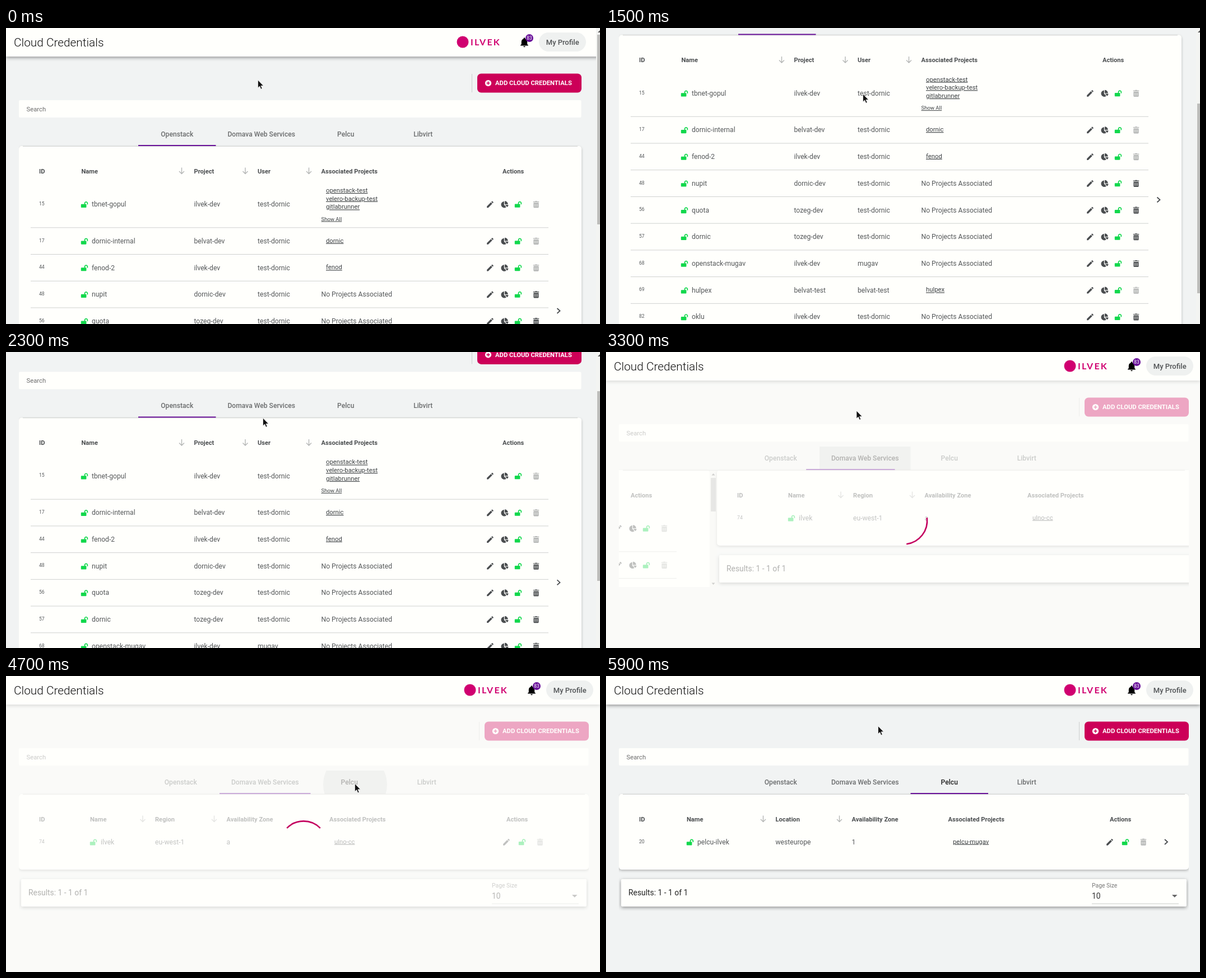
Write an HTML page that moves like this. It is 1060x529 px and loops after 6700 ms.

```html
<!DOCTYPE html>
<html lang="en">
<head>
<meta charset="utf-8">
<title>Cloud Credentials</title>
<style>
  html, body { margin: 0; width: 100%; height: 100%; overflow: hidden; background: #f1f3f3; }
  svg { display: block; font-family: Roboto, sans-serif; }
  .card { fill: #fffffc; filter: drop-shadow(0 2px 2px rgba(0,0,0,.25)); }
  .bar { fill: #fffffc; filter: drop-shadow(0 2px 3px rgba(0,0,0,.4)); }
  .link { text-decoration: underline; }
</style>
</head>
<body>
<svg id="stage" width="1060" height="529" viewBox="0 0 1060 529"></svg>
<script>
const LOOP = 6700, STEP = 100, SLIDE = 1017;
const INK = '#55585a', DARK = '#3c4043', GREEN = '#12d84c', PINK = '#cc0058', PURPLE = '#6a1299', WHITE = '#fffffc';

const ICONS = {
  lock: [576, 512, 12.4, 'M423.5 0C339.5.3 272 69.5 272 153.5V224H48c-26.5 0-48 21.5-48 48v192c0 26.5 21.5 48 48 48h352c26.5 0 48-21.5 48-48V272c0-26.5-21.5-48-48-48h-48v-71c0-40 32-73 71-73 40 0 73 32 73 72v80c0 13 11 24 24 24h32c13 0 24-11 24-24v-80C576 68 507.500 0 423.500 0z'],
  pencil: [24, 24, 15.6, 'M3 17.250V21h3.750L17.810 9.940l-3.750-3.750L3 17.250zM20.710 7.040c.39-.39.39-1.020 0-1.410l-2.340-2.340c-.39-.39-1.020-.39-1.410 0l-1.830 1.830 3.750 3.750z'],
  pie: [544, 512, 13, 'M528 288H290l158 158c6 6 16 7 23 1 38-37 65-86 73-141 1-10-7-18-16-18zM512 223C504 104 408 8 289 0c-9 0-17 7-17 16v224h224c9 0 17-8 16-17zM224 288V51c0-10-8-18-18-16C87 52-4 156 0 280c4 129 115 234 243 232 50-1 97-17 135-44 8-6 9-17 2-24z'],
  trash: [448, 512, 10.6, 'M32 464a48 48 0 0 0 48 48h288a48 48 0 0 0 48-48V128H32zM304 208h32v224h-32zM208 208h32v224h-32zM112 208h32v224h-32zM432 32H312l-10-19a24 24 0 0 0-21-13H167a24 24 0 0 0-22 13l-9 19H16a16 16 0 0 0-16 16v32h448V48a16 16 0 0 0-16-16z'],
  bell: [24, 24, 20.8, 'M12 22c1.100 0 2-.9 2-2h-4c0 1.100.89 2 2 2zm6-6v-5c0-3.070-1.640-5.640-4.500-6.320V4c0-.83-.67-1.500-1.500-1.500s-1.500.67-1.500 1.500v.68C7.630 5.360 6 7.920 6 11v5l-2 2v1h16v-1l-2-2z']
};

const text = (x, y, str, size = 12.13, fill = INK, weight = 400, extra = '') =>
  `<text x="${x}" y="${y}" font-size="${size}" fill="${fill}" font-weight="${weight}" ${extra}>${str}</text>`;
const rect = (x, y, w, h, extra) => `<rect x="${x}" y="${y}" width="${w}" height="${h}" ${extra}/>`;
const path = (d, stroke, width = 1, extra = '') =>
  `<path d="${d}" fill="none" stroke="${stroke}" stroke-width="${width}" ${extra}/>`;
const link = (x, y, str, size = 11.27) => text(x, y, str, size, DARK, 400, 'class="link"');
const icon = (name, cx, cy, fill = '#4a4d4f') => {
  const [w, h, width, d] = ICONS[name], k = width / w;
  return `<path d="${d}" fill="${fill}" fill-rule="evenodd" transform="translate(${cx - width / 2} ${cy - h * k / 2}) scale(${k})"/>`;
};
const chevron = (x, y) => path(`M${x - 2.5} ${y - 4.500}l5 4.500-5 4.500`, '#4a4d4f', 1.8);
const sortArrow = x => path(`M${x} 249.500v11M${x - 4.500} 256l4.500 4.500 4.500-4.500`, '#b4b6b5', 1.4);
const heads = (cols, arrows) =>
  cols.map(([x, s]) => text(x, 259.5, s, 11.15, '#4a4d4f', 700)).join('') + arrows.map(sortArrow).join('');

function row(cy, id, iconX, name, cells, actions, locked) {
  return text(59, cy + 2, id, 8.67) + icon('lock', iconX + 6, cy + .5, GREEN) + text(iconX + 19, cy + 4.3, name) +
    cells.map(([x, s]) => text(x, cy + 4.3, s)).join('') +
    actions.map(([name, x]) => icon(name, x, cy + .3,
      name === 'lock' ? GREEN : name === 'trash' && locked ? '#b2b4b3' : undefined)).join('');
}

function openstackTable() {
  const rows = [
    ['15', 'tbnet-gopul', 'ilvek-dev', 'test-dornic', ''],
    ['17', 'dornic-internal', 'belvat-dev', 'test-dornic', 'dornic'],
    ['44', 'fenod-2', 'ilvek-dev', 'test-dornic', 'fenod'],
    ['48', 'nupit', 'dornic-dev', 'test-dornic'],
    ['56', 'quota', 'tozeg-dev', 'test-dornic'],
    ['57', 'dornic', 'tozeg-dev', 'test-dornic'],
    ['68', 'openstack-mugav', 'ilvek-dev', 'mugav'],
    ['69', 'hulpex', 'belvat-test', 'belvat-test', 'hulpex'],
    ['82', 'oklu', 'ilvek-dev', 'test-dornic']
  ];
  let out = rect(23, 211, 1004, 553, 'rx="5" class="card"') +
    heads([[59, 'ID'], [134.5, 'Name'], [335.5, 'Project'], [449, 'User'], [562.5, 'Associated Projects'], [886, 'Actions']],
      [313.5, 427, 540.5]);
  rows.forEach(([id, name, project, user, linked], i) => {
    const line = 356.8 + 47.72 * i, cy = i ? line - 23.9 : 315, locked = linked !== undefined;
    const cells = [[335.5, project], [449, user]];
    if (!locked) cells.push([562.5, 'No Projects Associated']);
    if (linked) out += link(571, cy + 3, linked);
    out += row(cy, id, 134, name, cells, [['pencil', 864], ['pie', 890], ['lock', 914], ['trash', 946]], locked);
    if (i < rows.length - 1) out += path(`M44 ${line}H968`, '#cfd1d0');
  });
  out += ['openstack-test', 'velero-backup-test', 'gitlabrunner'].map((s, i) => link(571, 294 + i * 14.7, s)).join('');
  return out + link(562.5, 344.5, 'Show All', 9.54) + chevron(986, 505.5);
}

// Scrollbar the first table gets once its view is shorter than its content
const innerBar = rect(1027, 211, 13, 209, 'fill="#f1f1ef"') + rect(1029, 225, 9, 60, 'fill="#bcbcba"') +
  '<path d="M1030.500 220.500h6l-3-3.500zM1030.500 412.500h6l-3 3.500z" fill="#777"/>';

const shortTable = (head, arrows, body) =>
  rect(23, 211, SLIDE, 135, 'rx="5" class="card"') + heads(head, arrows) + body +
  rect(27, 363, 1009, 49, 'rx="2" class="bar"') + text(40, 392, 'Results: 1 - 1 of 1', 13.87, '#222') +
  text(867, 377.5, 'Page Size', 10.4, '#777') + text(867, 398, '10', 13.87, '#333') +
  path('M867 407H1022', '#c8cac9') + '<path d="M1010 391h9.500l-4.750 4.750z" fill="#666"/>';

const domavaTable = shortTable(
  [[59, 'ID'], [150, 'Name'], [266, 'Region'], [393.5, 'Availability Zone'], [577, 'Associated Projects'], [893, 'Actions']],
  [244, 371.5],
  row(296.5, '74', 150, 'ilvek', [[266, 'eu-west-1'], [393.5, 'a']], [['pencil', 893], ['lock', 921], ['trash', 953]], true) +
  link(586, 299.5, 'ulno-cc'));

const pelcuTable = shortTable(
  [[59, 'ID'], [144, 'Name'], [302.5, 'Location'], [438.5, 'Availability Zone'], [610.5, 'Associated Projects'], [899, 'Actions']],
  [280.5, 416.5],
  row(296.5, '20', 144, 'pelcu-ilvek', [[302.5, 'westeurope'], [438.5, '1']], [['pencil', 899], ['lock', 927], ['trash', 959]], true) +
  link(619, 299.5, 'pelcu-mugav') + chevron(999.5, 296.5));

const TABS = [['Openstack', 236, 138.5], ['Domava Web Services', 374.5, 162.5], ['Pelcu', 537, 138.5], ['Libvirt', 675, 138.5]];

document.getElementById('stage').innerHTML = `
  <defs>
    <clipPath id="viewClip"><rect id="viewRect" x="23" y="205" width="${SLIDE}"/></clipPath>
    <clipPath id="tabClip"><rect id="tabRect" y="169" height="42"/></clipPath>
  </defs>
  ${rect(0, 0, 1060, 529, 'fill="#f1f3f3"')}
  <g id="page">
    ${rect(0, 0, 1060, 51, 'class="bar"')}
    ${text(14, 32.5, 'Cloud Credentials', 20.8, '#111', 300)}
    <g class="right">
      <circle cx="815" cy="25" r="10.5" fill="#d00070"/>
      ${text(829, 31, 'ILVEK', 16, '#d00070', 700, 'letter-spacing="2.2" style="font-family:Lato,sans-serif"')}
      ${icon('bell', 925, 25.5, '#000')}
      <circle cx="934" cy="18" r="7" fill="${PURPLE}"/>
      ${text(934, 21, '83', 8.4, '#fff', 400, 'text-anchor="middle"')}
      ${rect(951, 8, 84, 34, 'rx="17" fill="#eff1f0"')}
      ${text(993.2, 29.5, 'My Profile', 13, '#505355', 500, 'text-anchor="middle"')}
    </g>
    <g class="right">
      ${path('M831.500 82V115', '#cdcfce')}
      ${rect(841, 81.5, 186, 34, `rx="7" fill="${PINK}"`)}
      <circle cx="860.5" cy="98.5" r="5.6" fill="#fff"/>
      ${path('M857.500 98.500h6M860.500 95.500v6', PINK, 1.6)}
      ${text(873, 102.3, 'ADD CLOUD CREDENTIALS', 11.27, '#fff', 700)}
    </g>
    ${rect(23, 129, 0, 31, `id="search" rx="2" fill="${WHITE}"`)}
    ${text(36.5, 148.5, 'Search', 11.27, '#6c6c6c')}
    <g clip-path="url(#viewClip)">
      <g class="view">${openstackTable()}<g id="innerBar">${innerBar}</g></g>
      <g class="view">${domavaTable}</g>
      <g class="view">${pelcuTable}</g>
    </g>
    <path id="rule" stroke="#cdcfce"/>
    <g id="tabs">
      <circle id="ripple" clip-path="url(#tabClip)"/>
      ${TABS.map(([s, x, w]) => text(x + w / 2, 194, s, 12.13, '#6b6d6e', 500, 'class="tab" text-anchor="middle"')).join('')}
      <rect id="marker" y="209" height="2" fill="${PURPLE}"/>
    </g>
    ${rect(0, 51, 1060, 760, `id="veil" fill="${WHITE}" opacity=".65"`)}
  </g>
  <g id="pageBar">
    ${rect(1053, 0, 7, 529, 'fill="#f3f4f2"')}
    <path d="M1056 8h4v-4z" fill="#555"/>
    ${rect(1055, 12, 5, 339, 'id="thumb" fill="#bdbdbb"')}
  </g>
  ${path('M501.200 271.800A42 42 0 0 1 560.800 271.800', '#c4005f', 2.6, 'id="spinner"')}
  <path id="cursor" d="M0 0V14L3.200 11 5.400 16.200 7.700 15.200 5.500 10.300H10Z" fill="#111" stroke="#fff" stroke-width=".7"/>`;

const $ = id => document.getElementById(id);
const set = (el, attrs) => Object.entries(attrs).forEach(([k, v]) => el.setAttribute(k, v));
const show = (el, on) => el.setAttribute('visibility', on ? 'visible' : 'hidden');
const clamp = v => Math.max(0, Math.min(1, v));
const mix = (a, b, k) => a + (b - a) * k;

// Linear track through [time, ...values] points
function track(points, t) {
  const i = points.findIndex(p => p[0] >= t);
  if (i === 0) return points[0].slice(1);
  if (i < 0) return points[points.length - 1].slice(1);
  const a = points[i - 1], b = points[i], k = (t - a[0]) / (b[0] - a[0]);
  return a.slice(1).map((v, j) => mix(v, b[j + 1], k));
}

// cubic-bezier(.35, 0, .25, 1) over half a second
function slide(ms) {
  const x = clamp(ms / 500);
  let lo = 0, hi = 1;
  for (let i = 0; i < 24; i++) {
    const s = (lo + hi) / 2, r = 1 - s;
    if (3 * r * r * s * .35 + 3 * r * s * s * .25 + s * s * s < x) lo = s; else hi = s;
  }
  return 3 * (1 - lo) * lo * lo + lo ** 3;
}

const SCROLL = [[1100, 0], [1200, 37.3], [1500, 198.5], [1600, 231], [1800, 231], [1900, 232], [2000, 232],
  [2300, 93.6], [3000, 93.6], [3100, 0]];
const POINTER = [[500, 449.5, 93], [700, 458.5, 118], [2400, 458.5, 118], [2900, 447, 105], [3400, 447, 105],
  [3700, 447, 141], [3800, 447, 141], [4000, 470, 200], [4100, 470, 200], [4300, 540, 211], [4500, 622.5, 192.5],
  [5400, 622.5, 192.5], [5900, 485.5, 89.5]];
const CLICKS = [
  { at: 3000, tab: 1, x: 447, y: 198, slideAt: 3020, spinAt: 2945, until: 3700 },
  { at: 4700, tab: 2, x: 616.5, y: 194, slideAt: 4700, spinAt: 4700, until: 5300 }
];

function render(t) {
  const wide = t >= 3100, extra = wide ? 13 : 0;
  const [scroll] = track(SCROLL, t), [x, y] = track(POINTER, t);
  const click = CLICKS.filter(c => t >= c.at).pop();
  const loading = click && t < click.until;
  const position = CLICKS.reduce((sum, c) => sum + slide(t - c.slideAt), 0);

  set($('page'), { transform: `translate(0 ${-scroll})` });
  document.querySelectorAll('.right').forEach(g => set(g, { transform: `translate(${extra} 0)` }));
  set($('search'), { width: 1003.5 + extra });
  set($('rule'), { d: `M30 211.300H${1020 + extra}` });
  set($('viewRect'), { height: wide ? 215 : 620 });
  set($('tabs'), { transform: `translate(${extra / 2} 0)` });
  show($('innerBar'), wide);
  document.querySelectorAll('.view').forEach((g, i) => {
    set(g, { transform: `translate(${(i - position) * SLIDE} 0)`, display: Math.abs(i - position) < 1 ? 'inline' : 'none' });
  });

  const from = Math.min(1, Math.floor(position)), k = position - from;
  set($('marker'), { x: mix(TABS[from][1], TABS[from + 1][1], k), width: mix(TABS[from][2], TABS[from + 1][2], k) });
  document.querySelectorAll('.tab').forEach((el, i) => set(el, { fill: click && click.tab === i ? '#222' : '#6b6d6e' }));

  show($('ripple'), click);
  if (click) {
    const age = t - click.at;
    set($('ripple'), { cx: click.x, cy: click.y, r: 57 + age * .4, 'fill-opacity': .1 * clamp((700 - age) / 300) });
    set($('tabRect'), { x: TABS[click.tab][1], width: TABS[click.tab][2] });
    set($('spinner'), { transform: `rotate(${(t - click.spinAt) * .36} 531 301.500)` });
  }
  show($('veil'), loading);
  show($('spinner'), loading);
  show($('pageBar'), !wide);
  set($('thumb'), { y: 12 + scroll * .62 });
  set($('cursor'), { transform: `translate(${x} ${y})` });
}

let shown = -1;
function tick() {
  const t = Math.floor(performance.now() % LOOP / STEP) * STEP;
  if (t !== shown) render(shown = t);
  requestAnimationFrame(tick);
}
tick();
</script>
</body>
</html>
```
